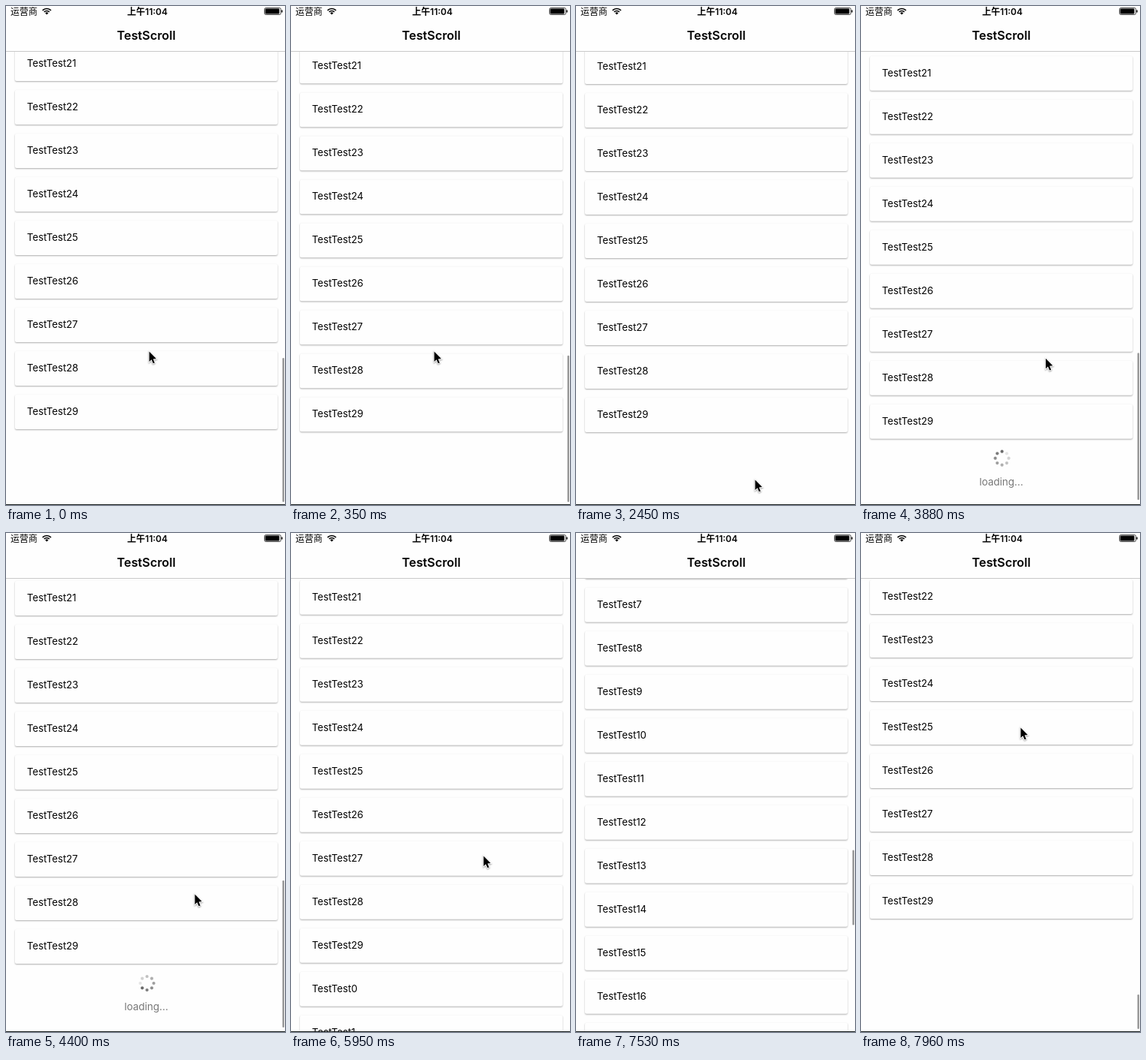
An HTML page with a canvas for the animation above (8 s loop, 373 by 665 pixels).

```html
<!DOCTYPE html>
<html lang="zh">
<head>
<meta charset="utf-8">
<title>TestScroll</title>
<style>
html, body { margin: 0; width: 100%; height: 100%; overflow: hidden; background: #fefefe; }
canvas { display: block; width: 373px; height: 665px; }
</style>
</head>
<body>
<canvas id="stage"></canvas>
<script>
const W = 373, H = 665, LOOP = 8000;
const HEADER = 61, PITCH = 58, BATCH = 30;
const PAGE = '#fefefe';
const INTER = 'Inter, Roboto, sans-serif';
const CJK = 'Inter, "Noto Sans CJK SC", "Noto Sans CJK", sans-serif';
const PULL = 3480, LOADED = 5945, FLING = 7350;
const SETTLED = 4.67, SPEED = 5.072;

// Where the hand pauses or turns: [time, x, y]
const POINTER = [
  [1050, 191, 460], [1060, 177, 512], [1300, 52, 620], [1600, 214, 612], [1930, 114, 606],
  [2450, 239, 631], [3170, 239, 631], [3500, 243, 462], [4400, 252, 481], [5460, 257, 430],
  [6740, 257, 430], [7080, 232, 510], [FLING, 232, 490], [7480, 222, -40], [7750, 216, -40],
  [7960, 213, 259]
];

const canvas = document.getElementById('stage');
const ctx = canvas.getContext('2d');
const dpr = window.devicePixelRatio || 1;
canvas.width = W * dpr;
canvas.height = H * dpr;

const clamp = v => Math.max(0, Math.min(1, v));
const ease = u => (1 - Math.cos(Math.PI * clamp(u))) / 2;

function pointerAt(t) {
  const i = POINTER.findIndex(p => p[0] > t);
  if (i < 0) return POINTER[POINTER.length - 1].slice(1);
  const b = POINTER[i], a = POINTER[i - 1] || b;
  const u = ease((t - a[0]) / (b[0] - a[0]));
  return [a[1] + (b[1] - a[1]) * u, a[2] + (b[2] - a[2]) * u];
}

// List shift from the end of the first batch
function shiftAt(t) {
  if (t < PULL) return -4 * Math.exp(-Math.max(0, t - 90) / 160);
  if (t < FLING) return (SETTLED + 5 * Math.exp(-(t - 3780) / 470)) * ease((t - PULL) / 300);
  const room = SETTLED + BATCH * PITCH;
  const run = SPEED * (t - FLING);
  const late = Math.max(0, t - FLING - room / SPEED) / 90;
  const bounce = 130 * late * Math.exp(1 - late);
  return SETTLED - Math.min(room, run) - bounce;
}

function barAlpha(t) {
  const shown = (on, off) => clamp((t - on) / 80) * clamp((off - t) / 350);
  return Math.max(shown(-100, 700), shown(PULL, 4850), shown(FLING - 20, 2 * LOOP));
}

function text(s, x, y, font, color = '#000', align = 'left') {
  ctx.font = font;
  ctx.fillStyle = color;
  ctx.textAlign = align;
  ctx.fillText(s, x, y);
}

function box(x, y, w, h, r, color) {
  ctx.fillStyle = color;
  ctx.beginPath();
  ctx.roundRect(x, y, w, h, r);
  ctx.fill();
}

function shadow(alpha) {
  ctx.shadowColor = `rgba(0,0,0,${alpha})`;
  ctx.shadowBlur = 2 * dpr;
  ctx.shadowOffsetY = dpr;
}

function card(label, y) {
  ctx.save();
  shadow(0.32);
  box(12, y - 22, 351, 46, 2, PAGE);
  ctx.restore();
  text(label, 28, y + 5, '13.2px ' + INTER);
}

function spinner(x, y, t) {
  const head = Math.floor((t - 4390) / 125) + 5;
  for (let i = 0; i < 8; i++) {
    const age = (((head - i) % 8) + 8) % 8;
    const a = i * Math.PI / 4;
    ctx.fillStyle = `rgba(80,80,80,${0.85 - age * 0.1})`;
    ctx.beginPath();
    ctx.arc(x + 9 * Math.sin(a), y - 9 * Math.cos(a), 2.1, 0, 2 * Math.PI);
    ctx.fill();
  }
}

function list(t, shift, full) {
  const count = full ? 2 * BATCH : BATCH;
  const top = 544 - (BATCH - 1) * PITCH + shift;
  for (let i = 0; i < count; i++) {
    const y = top + i * PITCH;
    if (y > 30 && y < H + 30) card('TestTest' + i % BATCH, y);
  }
  if (t >= PULL && !full) {
    spinner(188.5, 594 + shift, t);
    text('loading...', 187.5, 630 + shift, '13.5px ' + INTER, '#777', 'center');
  }
}

function scrollBar(t, shift, full) {
  const rest = shift + (full ? BATCH * PITCH : 0);
  const len = full ? 100 : 196;
  const size = Math.max(8, len + Math.min(0, rest));
  const end = 661 - Math.max(0, rest) * (full ? 0.1676 : 0.326);
  ctx.globalAlpha = barAlpha(t);
  box(369.5, end - size, 2.5, size, 1.25, '#999');
  ctx.globalAlpha = 1;
}

function wifi(x, y) {
  const from = -Math.PI * 0.75, to = -Math.PI * 0.25;
  ctx.strokeStyle = '#000';
  ctx.lineWidth = 1.7;
  for (const r of [8, 5]) {
    ctx.beginPath();
    ctx.arc(x, y, r, from, to);
    ctx.stroke();
  }
  ctx.fillStyle = '#000';
  ctx.beginPath();
  ctx.moveTo(x, y);
  ctx.arc(x, y, 3, from, to);
  ctx.fill();
}

function battery(x, y) {
  ctx.strokeStyle = '#000';
  ctx.lineWidth = 0.7;
  ctx.beginPath();
  ctx.roundRect(x, y, 22, 9, 2);
  ctx.stroke();
  box(x + 1, y + 1, 19, 7, 1, '#000');
  box(x + 22.8, y + 2.8, 1.4, 3.4, 0.7, '#000');
}

function header() {
  ctx.fillStyle = PAGE;
  ctx.fillRect(0, 0, W, HEADER);
  ctx.fillStyle = '#c9c9c9';
  ctx.fillRect(0, HEADER - 1, W, 1);
  text('运营商', 6, 11.5, '12px ' + CJK);
  wifi(54.5, 11.5);
  text('上午11:04', 189, 11.5, '600 12px ' + CJK, '#000', 'center');
  battery(345.5, 2.5);
  text('TestScroll', 187.5, 45, '600 16.3px ' + INTER, '#000', 'center');
}

function pointer(x, y) {
  ctx.save();
  ctx.translate(x + 0.5, y + 0.5);
  const arrow = new Path2D('M0 0V13.5L3 10.8L5.2 15.8L7.3 14.9L5.2 10L9.4 9.6Z');
  shadow(0.4);
  ctx.strokeStyle = '#fff';
  ctx.lineWidth = 1.8;
  ctx.stroke(arrow);
  ctx.shadowColor = 'transparent';
  ctx.fillStyle = '#000';
  ctx.fill(arrow);
  ctx.restore();
}

function draw(t) {
  const shift = shiftAt(t), full = t >= LOADED;
  ctx.setTransform(dpr, 0, 0, dpr, 0, 0);
  ctx.fillStyle = PAGE;
  ctx.fillRect(0, 0, W, H);
  list(t, shift, full);
  scrollBar(t, shift, full);
  header();
  ctx.fillStyle = '#161c1c';
  ctx.fillRect(0, H - 1, W, 1);
  pointer(...pointerAt(t));
}

const start = performance.now();
function frame() {
  draw((performance.now() - start) % LOOP);
  requestAnimationFrame(frame);
}
frame();
</script>
</body>
</html>
```
